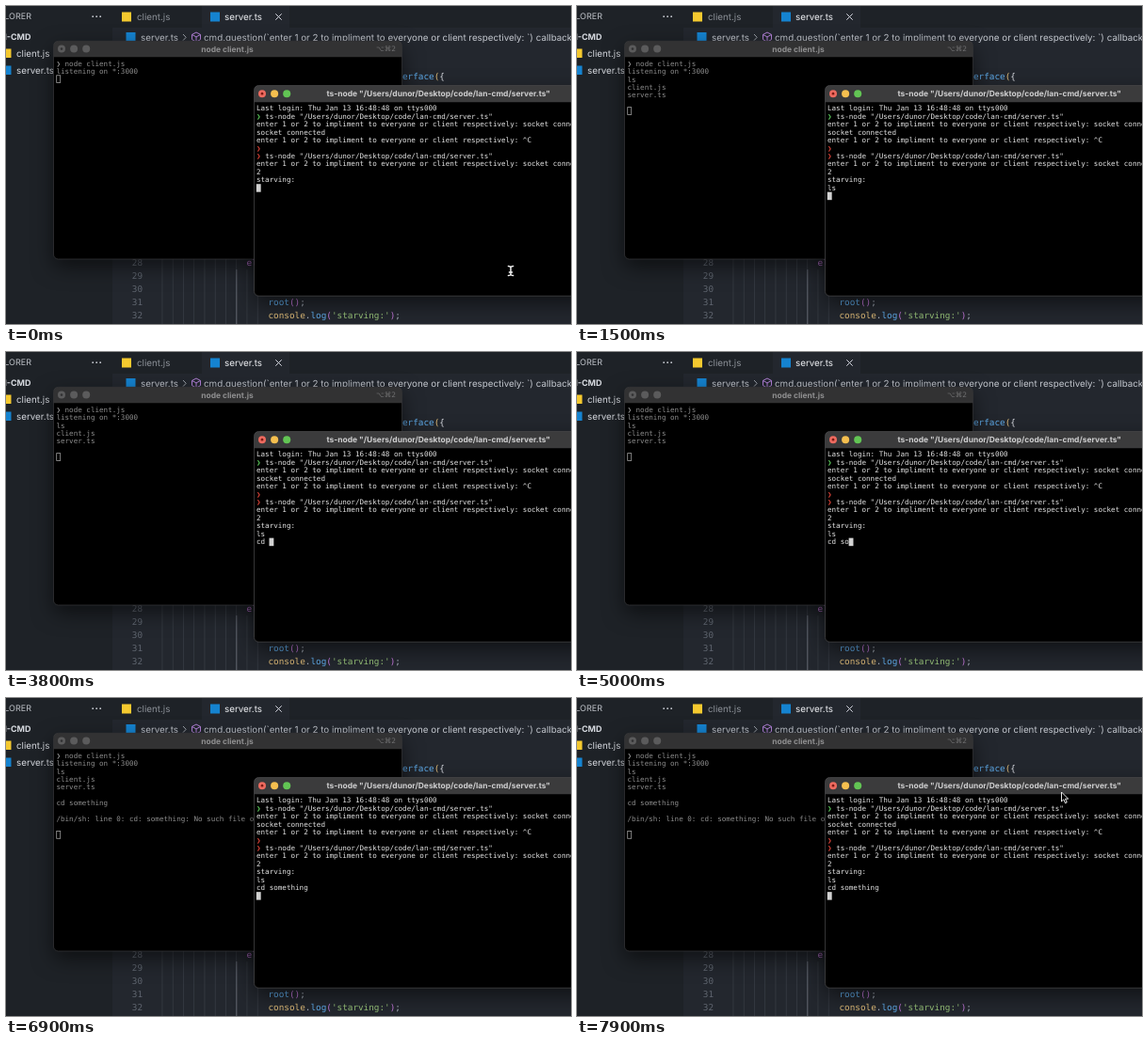
Recreate the animation shown at these times as an HTML page. Size 600 by 338 pixels, loop 8 s.

```html
<!DOCTYPE html>
<html lang="en">
<head>
<meta charset="utf-8">
<title>Terminal session</title>
<style>
  html, body { margin: 0; width: 100%; height: 100%; overflow: hidden; background: #23272e; }
  svg { display: block; width: 600px; height: 338px; }
  text { white-space: pre; text-rendering: geometricPrecision; }
  .ui { font: 9.8px Inter, "Open Sans", sans-serif; }
  .side { font: 9px Inter, "Open Sans", sans-serif; }
  .title { font: 700 8.45px Inter, "Open Sans", sans-serif; text-anchor: middle; }
  .keys { font: 7.5px "DejaVu Sans", sans-serif; text-anchor: end; }
  .term { font: 7.58px "DejaVu Sans Mono", monospace; }
  .code { font: 9.33px "DejaVu Sans Mono", monospace; }
  .end { text-anchor: end; }
  .bold { font-weight: 700; }
  .win { filter: drop-shadow(0 8px 11px rgba(0, 0, 0, .55)); }
</style>
</head>
<body>
<svg id="stage" viewBox="0 0 600 338">
  <g id="editor"></g>
  <g id="client"></g>
  <g id="server"></g>
  <path id="beam" d="M-2.6-5Q-.4-5 0-3.6Q.4-5 2.6-5M0-3.6V3.6M-2.6 5Q-.4 5 0 3.6Q.4 5 2.6 5M-1.6 1.4H1.6" fill="none" stroke="#f2f2f2" stroke-width="1.5" stroke-linecap="round"/>
  <path id="arrow" d="M0 0V10L2.3 7.9L4 11.8L5.7 11L4 7.2H7.2Z" fill="#000" stroke="#fff" stroke-width=".9" stroke-linejoin="round"/>
</svg>
<script>
const LOOP = 8000, CHAR = 4.563, LINE = 8.47;
const $ = id => document.getElementById(id);

function add(parent, tag, attrs, content) {
  const el = document.createElementNS('http://www.w3.org/2000/svg', tag);
  for (const key in attrs) el.setAttribute(key, attrs[key]);
  if (content) el.textContent = content;
  parent.append(el);
  return el;
}
const text = (g, x, y, str, cls, fill) => add(g, 'text', { x, y, class: cls, fill }, str);
const rect = (g, x, y, width, height, fill, more) =>
  add(g, 'rect', { x, y, width, height, fill, ...more });
const dot = (g, cx, cy, r, fill) => add(g, 'circle', { cx, cy, r, fill });
const stroke = (g, d, color, width = 1) =>
  add(g, 'path', { d, fill: 'none', stroke: color, 'stroke-width': width });

function drawEditor(g) {
  const yellow = '#f5c92f', sky = '#1583d0', grey = '#8d9299', pale = '#d7dae0', crumb = '#c3c7ce';
  rect(g, 0, 0, 600, 338, '#23272e');
  rect(g, 0, 0, 113, 338, '#1e2227');
  rect(g, 113, 0, 487, 23, '#1e2227');
  rect(g, 208, 0, 93, 23, '#23272e');

  text(g, 27, 14.3, 'EXPLORER', 'side end', '#c0c4ca');
  for (const x of [92.2, 96.2, 100.2]) dot(g, x, 11.2, .9, '#c8ccd2');
  text(g, 26.5, 36.4, 'LAN-CMD', 'side bold end', '#d7dae0');
  rect(g, -4, 45.5, 9.5, 9.5, yellow);
  text(g, 11, 53.8, 'client.js', 'ui', pale);
  rect(g, -4, 63.5, 9.5, 9.5, sky);
  text(g, 11, 71.8, 'server.ts', 'ui', pale);

  rect(g, 123, 6.5, 10, 10, yellow);
  text(g, 139, 14.8, 'client.js', 'ui', grey);
  rect(g, 217, 6.5, 10, 10, sky);
  text(g, 232, 14.8, 'server.ts', 'ui', '#f0f2f5');
  stroke(g, 'M286.3 8.3L292.7 14.7M292.7 8.3L286.3 14.7', '#d8dae3');

  rect(g, 127.5, 28, 10, 10, sky);
  text(g, 143, 36.6, 'server.ts', 'ui', crumb);
  stroke(g, 'M188 30L191.2 33.3L188 36.6', '#9ba0a8');
  stroke(g, 'M202 28L206.5 30.4V35.6L202 38.2L197.5 35.6V30.4ZM197.5 30.4L202 32.9L206.5 30.4M202 32.9V38.2', '#b180d7');
  text(g, 210, 36.6, 'cmd.question(`enter 1 or 2 to impliment to everyone or client respectively: `) callback', 'ui', crumb);

  for (let i = 0; i < 10; i++) rect(g, 165.6 + i * 11.25, 262, .7, 76, '#3a3f47');
  rect(g, 244.4, 280, .9, 58, '#666b74');
  for (let i = 0; i < 5; i++) text(g, 133.8, 276.3 + i * 13.9, String(28 + i), 'code', '#5f656f');
  rect(g, 255, 266, 8, 14, '#23272e');

  const blue = '#61afef', gold = '#e5c07b', violet = '#c678dd', plain = '#abb2bf';
  const code = (x, y, parts) => {
    const row = text(g, x, y, '', 'code', plain);
    for (const [str, fill] of parts) add(row, 'tspan', { fill }, str);
  };
  code(255.5, 276.3, [['else', violet]]);
  code(421, 78.3, [['erface', blue], ['(', gold], ['{', '#d7dae0']]);
  code(278.5, 317.8, [['root', blue], ['()', violet], [';', plain]]);
  code(278.5, 331.7, [['console', gold], ['.', plain], ['log', blue], ['(', violet],
    ["'starving:'", '#98c379'], [')', violet], [';', plain]]);
}

function drawWindow(g, x, y, w, h, bar, look, titleX, title) {
  rect(g, x, y, w, h, '#000', { rx: 5, class: 'win' });
  add(g, 'path', { d: `M${x} ${y + bar}V${y + 5}q0-5 5-5H${x + w - 5}q5 0 5 5V${y + bar}Z`, fill: look.bar });
  rect(g, x, y, w, h, 'none', { rx: 5, stroke: look.edge, 'stroke-width': .7 });
  const cy = y + bar / 2 - .2;
  look.lights.forEach((fill, i) => dot(g, x + 8.5 + i * 13.1, cy, 4, fill));
  dot(g, x + 8.5, cy, 1.3, look.mark);
  text(g, titleX, y + bar / 2 + 2.9, title, 'title', look.title);
}

// Terminal rows; each prompt mark gets its own element.
function rows(g, x, y, fill, lines, prompts) {
  lines.forEach((line, i) => {
    const indent = prompts[i] ? 2 * CHAR : 0;
    if (prompts[i]) text(g, x, y + i * LINE, '❯', 'term', prompts[i]);
    if (line) text(g, x + indent, y + i * LINE, line, 'term', fill);
  });
}

const run = 'ts-node "/Users/dunor/Desktop/code/lan-cmd/server.ts"';
const ask = 'enter 1 or 2 to impliment to everyone or client respectively: ';
const dim = '#8c8c8c', lit = '#e4e4e4', left = 266;
const idle = {
  bar: '#323233', edge: '#39393b', title: '#8f8f90', mark: '#323233',
  lights: ['#5b5b5c', '#5b5b5c', '#5b5b5c']
};
const active = {
  bar: '#3b3b3c', edge: '#4c4c4e', title: '#cfcfd0', mark: '#7d1a14',
  lights: ['#ed6a5f', '#f5bf4f', '#62c554']
};

drawEditor($('editor'));

const client = $('client');
drawWindow(client, 50.5, 37.3, 370, 231.7, 17, idle, 235, 'node client.js');
text(client, 414, 48, '⌥⌘2', 'keys', '#6f6f70');
rows(client, 53.4, 63.6, dim, ['node client.js', 'listening on *:3000'], { 0: dim });
const listing = add(client, 'g', {}), failure = add(client, 'g', {});
rows(listing, 53.4, 63.6 + 2 * LINE, dim, ['ls', 'client.js', 'server.ts'], {});
rows(failure, 53.4, 63.6 + 6 * LINE, dim,
  ['cd something', '', '/bin/sh: line 0: cd: something: No such file or directory'], {});
const box = rect(client, 53.7, 0, 4, 7.8, 'none', { stroke: '#a0a0a0', 'stroke-width': .8 });

const server = $('server');
drawWindow(server, 263.5, 84.5, 400, 223.7, 17.7, active, 459.3, run);
rows(server, left, 111.2, lit, [
  'Last login: Thu Jan 13 16:48:48 on ttys000', run, ask + 'socket connected',
  'socket connected', ask + '^C', '', run, ask + 'socket connected', '2', 'starving:'
], { 1: '#5fd35f', 5: '#e5453a', 6: '#e5453a' });
const typed = [10, 11].map(i => text(server, left, 111.2 + i * LINE, '', 'term', lit));
const block = rect(server, left, 0, CHAR + .3, 8.5, '#d2d2d2');

// Each entry: time in ms, everything typed so far.
const keys = [
  [0, ''], [500, 'l'], [700, 'ls'], [1000, 'ls\n'],
  [3000, 'ls\nc'], [3200, 'ls\ncd'], [3800, 'ls\ncd '], [3900, 'ls\ncd s'], [4800, 'ls\ncd so'],
  [5200, 'ls\ncd som'], [5300, 'ls\ncd some'], [5500, 'ls\ncd somet'], [5600, 'ls\ncd someth'],
  [5800, 'ls\ncd somethi'], [5900, 'ls\ncd somethin'], [6100, 'ls\ncd something'], [6500, 'ls\ncd something\n']
];
const show = (el, on) => el.setAttribute('visibility', on ? 'visible' : 'hidden');

function frame(now) {
  const t = now % LOOP;
  const lines = keys.findLast(k => k[0] <= t)[1].split('\n');
  const last = lines.length - 1;
  typed.forEach((el, i) => { el.textContent = lines[i] || ''; });
  block.setAttribute('x', left - .2 + lines[last].length * CHAR);
  block.setAttribute('y', 104.5 + (10 + last) * LINE);

  const listed = t >= 1100, failed = t >= 6600;
  show(listing, listed);
  show(failure, failed);
  box.setAttribute('y', 56.8 + (failed ? 10 : listed ? 6 : 2) * LINE);

  // The pointer moves in 100 ms steps and is hidden while typing.
  const p = Math.min(1, Math.max(0, (Math.floor(t / 100) - 73) / 6));
  const e = p * p * (3 - 2 * p);
  const x = 536 - 21.5 * e, y = 281.5 - 181.5 * e;
  const visible = t < 500 || t >= 7300, onBar = y < 102;
  for (const id of ['beam', 'arrow']) $(id).setAttribute('transform', `translate(${x} ${y})`);
  show($('beam'), visible && !onBar);
  show($('arrow'), visible && onBar);
  requestAnimationFrame(frame);
}
frame(performance.now());
</script>
</body>
</html>
```
